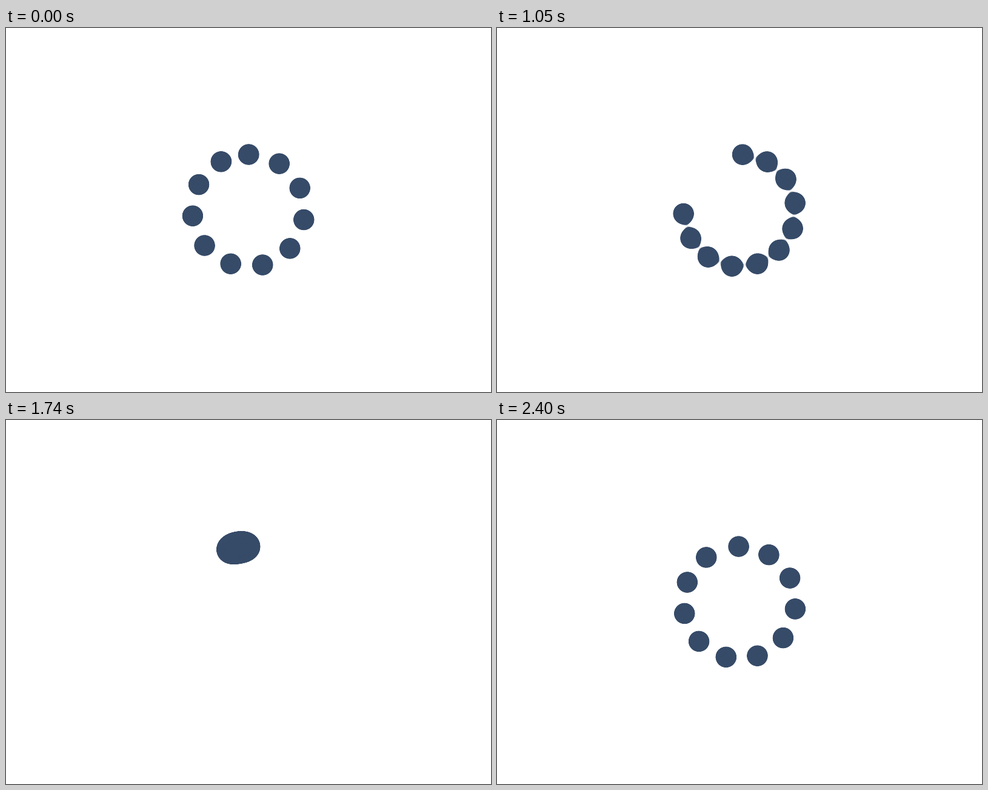
An HTML page that plays this animation: 800x600 px, repeating every 2430 ms.

```html
<!DOCTYPE html>
<html lang="en">
<head>
<meta charset="utf-8">
<title>Loader</title>
<style>
  html, body { margin: 0; width: 100%; height: 100%; overflow: hidden; background: #fff; }
  svg { display: block; width: 800px; height: 600px; }
</style>
</head>
<body>
<svg viewBox="0 0 800 600">
  <defs>
    <radialGradient id="soft" gradientUnits="userSpaceOnUse" cx="0" cy="0" r="40"></radialGradient>
    <filter id="goo" filterUnits="userSpaceOnUse" x="0" y="0" width="800" height="600" color-interpolation-filters="sRGB">
      <feComponentTransfer><feFuncA type="linear" slope="24" intercept="-11.5"/></feComponentTransfer>
    </filter>
  </defs>
  <g id="ring" filter="url(#goo)"></g>
</svg>
<script>
const COUNT = 11, STEP = 33.05, RADIUS = 92.5, CX = 400, CY = 301;
const COLOR = '#364b68', LOOP = 2430, TICK = 30;

// time in ms, progress in half cycles (gather, spread, ...), drift in degrees
const KEYS = [
  [0, 0, 0.2], [330, 0.5235, 2], [810, 1.286, 4.6], [1290, 2.0915, 1.6],
  [1530, 2.472, 2.2], [2010, 3.288, -0.6], [2400, 3.905, -0.9], [LOOP, 3.953, -0.9]
];

function add(parent, name, attrs) {
  const el = document.createElementNS('http://www.w3.org/2000/svg', name);
  for (const key in attrs) el.setAttribute(key, attrs[key]);
  return parent.appendChild(el);
}

// Soft-edged dots merge once the group's alpha is sharpened.
const soft = document.getElementById('soft');
for (let r = 0; r <= 40; r++) {
  const alpha = r < 40 ? 1 / (1 + Math.exp((r - 17.2) / 4.1)) : 0;
  add(soft, 'stop', { offset: r / 40, 'stop-color': COLOR, 'stop-opacity': alpha.toFixed(4) });
}

const ring = document.getElementById('ring');
const dots = Array.from({ length: COUNT }, () => add(ring, 'circle', { r: 40, fill: 'url(#soft)' }));

// cubic-bezier(.42, 0, .58, 1)
function easeInOut(x) {
  let lo = 0, hi = 1;
  for (let n = 0; n < 24; n++) {
    const s = (lo + hi) / 2, q = 1 - s;
    if (1.26 * s * q * q + 1.74 * s * s * q + s * s * s < x) lo = s; else hi = s;
  }
  return lo * lo * (3 - 2 * lo);
}

function sample(t) {
  let i = 1;
  while (t > KEYS[i][0]) i++;
  const a = KEYS[i - 1], b = KEYS[i];
  const f = (t - a[0]) / (b[0] - a[0]);
  return [a[1] + (b[1] - a[1]) * f, a[2] + (b[2] - a[2]) * f];
}

function draw(t) {
  const [progress, drift] = sample(t);
  const half = Math.floor(progress);
  const p = easeInOut(progress - half);
  const gathering = half % 2 === 0;
  dots.forEach((dot, i) => {
    const home = i * STEP;
    const deg = drift + (gathering ? home + (360 - home) * p : home * p);
    const rad = deg * Math.PI / 180;
    const x = CX + RADIUS * Math.sin(rad), y = CY - RADIUS * Math.cos(rad);
    dot.setAttribute('transform', `translate(${x.toFixed(2)} ${y.toFixed(2)})`);
  });
}

const start = performance.now();
function frame() {
  const t = (performance.now() - start) % LOOP;
  draw(Math.floor(t / TICK) * TICK);
  requestAnimationFrame(frame);
}
frame();
</script>
</body>
</html>
```
